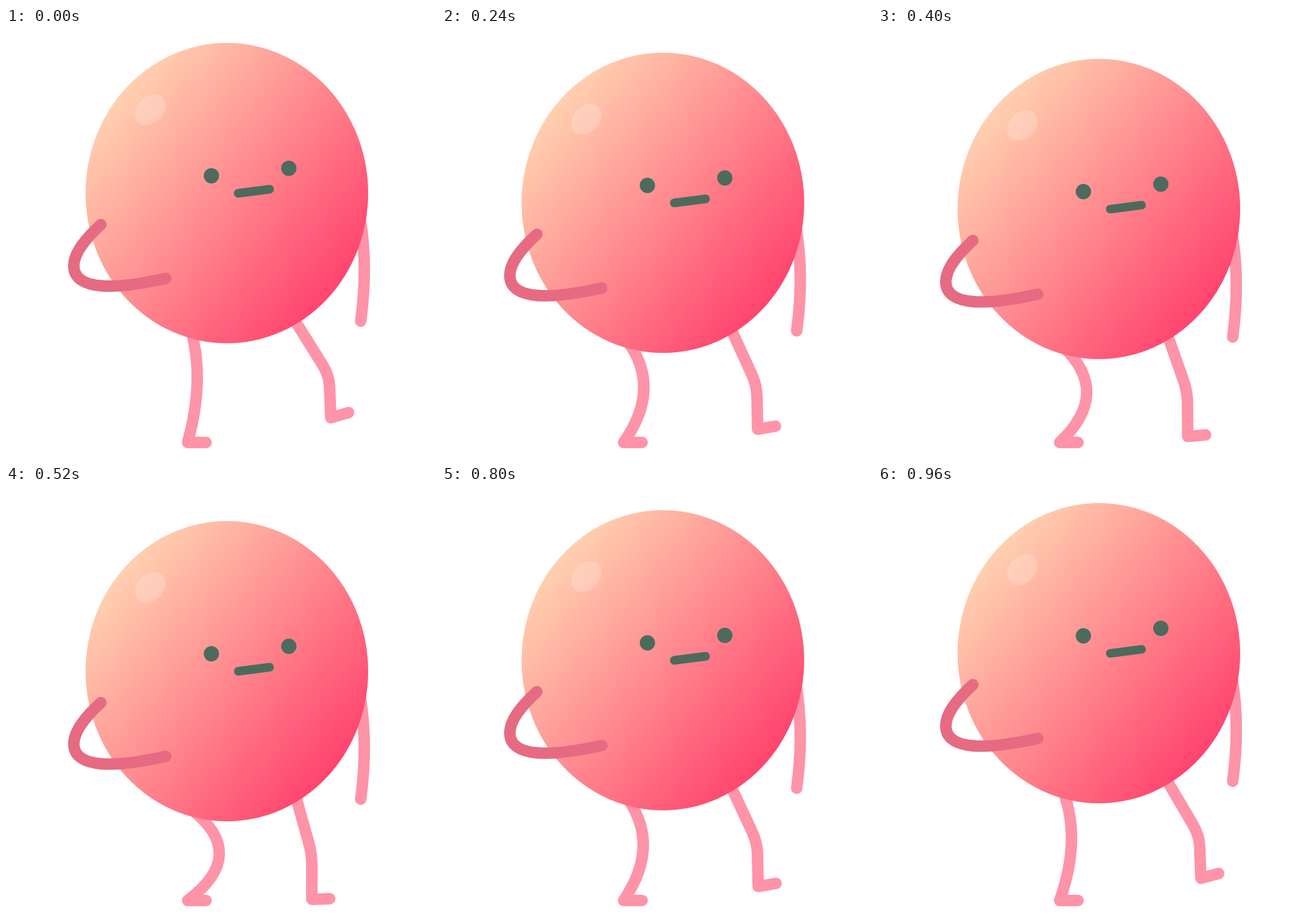
Recreate the animation shown at these times as an HTML page with a canvas. Size 748 px wide and 748 px high, loop 1000 ms.

```html
<!DOCTYPE html>
<html lang="en">
<head>
<meta charset="utf-8">
<title>Bouncing ball character</title>
<style>
  html, body { margin: 0; width: 100%; height: 100%; overflow: hidden; background: #fff; }
  canvas { display: block; width: 748px; height: 748px; }
</style>
</head>
<body>
<canvas id="stage" width="748" height="748"></canvas>
<script>
const ctx = document.getElementById('stage').getContext('2d');
const LOOP = 1000, STEP = 40, DIP = 34.8;
const LIMB = '#ff93a8', ARM = '#e66b82', FACE = '#4c6b5c';

// Vertical offset of the body: [ms, px]
const dipKeys = [[0, 0], [240, 16.8], [400, 27.6], [520, DIP],
                 [680, 24], [800, 15.8], [960, 3.6], [LOOP, 0]];

const skin = ctx.createLinearGradient(191, 125.5, 577.5, 449.5);
skin.addColorStop(0, '#ffd0b0');
skin.addColorStop(1, '#ff446e');

const mix = (a, b, k) => a + (b - a) * k;
const mixPt = (a, b, k) => [mix(a[0], b[0], k), mix(a[1], b[1], k)];

function dipAt(t) {
  const i = dipKeys.findIndex(([ms]) => ms > t);
  const [t0, y0] = dipKeys[i - 1], [t1, y1] = dipKeys[i];
  return mix(y0, y1, (t - t0) / (t1 - t0));
}

function stroke(path, color, width = 20) {
  ctx.strokeStyle = color;
  ctx.lineWidth = width;
  ctx.lineCap = ctx.lineJoin = 'round';
  ctx.stroke(path);
}

function oval(x, y, rx, ry, fill, angle = 0) {
  ctx.beginPath();
  ctx.ellipse(x, y, rx, ry, angle, 0, Math.PI * 2);
  ctx.fillStyle = fill;
  ctx.fill();
}

function standingLeg(k) {
  const leg = new Path2D();
  leg.moveTo(322, 527 + DIP * k);
  leg.quadraticCurveTo(mix(346, 423, k), mix(612, 641, k), 316, 721);
  leg.lineTo(348, 721);
  stroke(leg, LIMB);
}

function swingingLeg(k) {
  const hip = mixPt([500, 505], [504, 540], k);
  const knee = mixPt([562, 604], [532, 640], k);
  const heel = mixPt([565, 678], [532, 719], k);
  const toe = mixPt([596, 669], [563, 718], k);
  const leg = new Path2D();
  leg.moveTo(...hip);
  leg.lineTo(...mixPt(knee, hip, 0.2));
  leg.quadraticCurveTo(...knee, ...mixPt(knee, heel, 0.25));
  leg.lineTo(...heel);
  leg.lineTo(...toe);
  stroke(leg, LIMB);
}

const backArm = new Path2D('M616 330 Q630 415 617 510');
const frontArm = new Path2D('M165 342 C140 365 118 390 118 414 C118 442 150 449 180 449 C212 449 245 443 278 435.5');
const mouth = new Path2D('M404 287.5 L458.5 280.5');

function draw(t) {
  const dip = dipAt(t);
  ctx.fillStyle = '#fff';
  ctx.fillRect(0, 0, 748, 748);
  standingLeg(dip / DIP);
  swingingLeg(dip / DIP);

  ctx.save();
  ctx.translate(0, dip);
  stroke(backArm, LIMB);
  oval(384.2, 287.3, 245.8, 261.2, skin);
  oval(251, 142, 30, 22.5, 'rgba(255,255,255,0.2)', -Math.PI / 4);
  oval(357.3, 257, 13.3, 13.3, FACE);
  oval(492, 244, 13.3, 13.3, FACE);
  stroke(mouth, FACE, 15);
  stroke(frontArm, ARM);
  ctx.restore();
}

const start = performance.now();
function tick() {
  const t = (performance.now() - start) % LOOP;
  draw(Math.floor(t / STEP) * STEP);
  requestAnimationFrame(tick);
}
tick();
</script>
</body>
</html>
```
